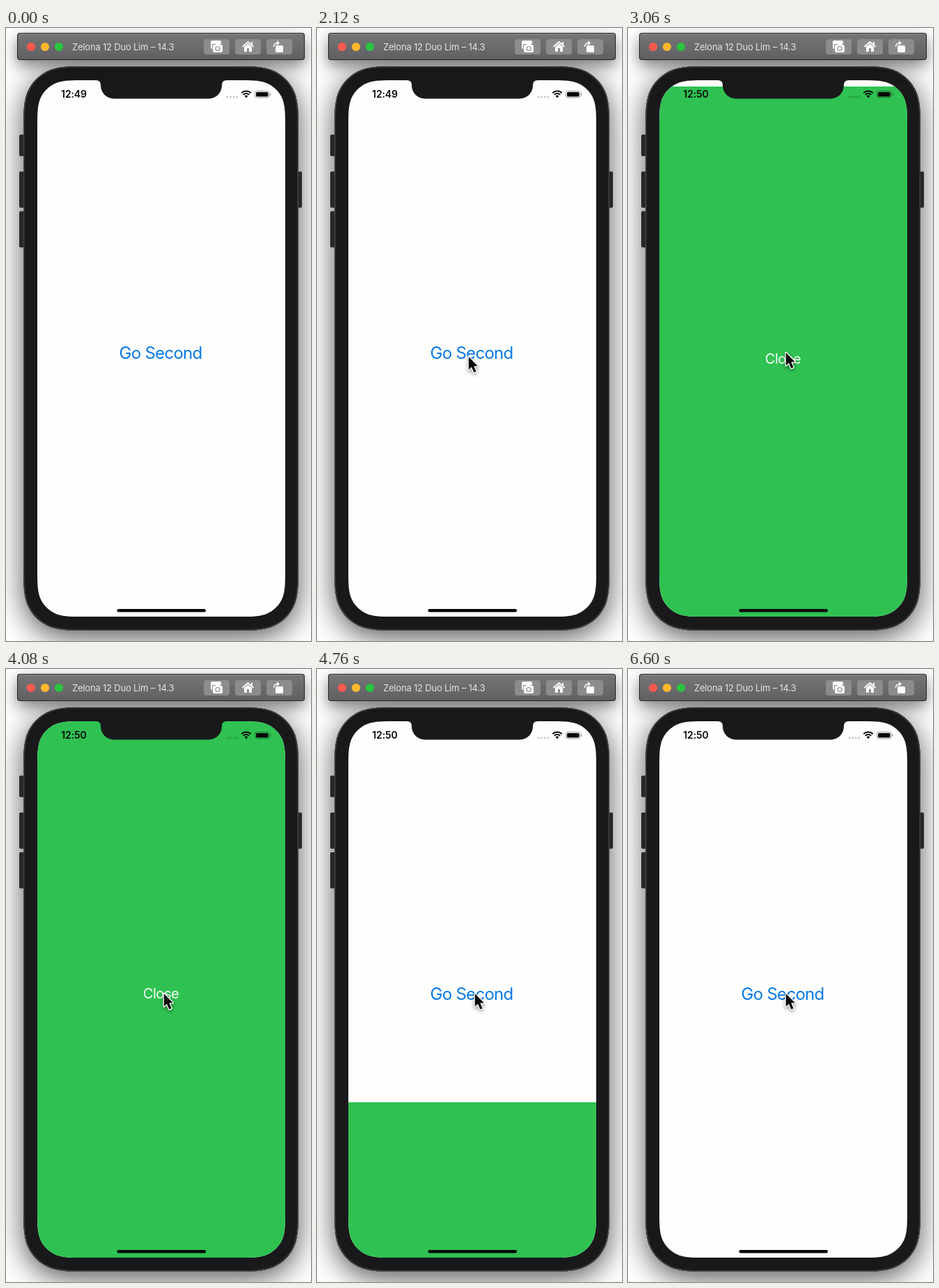
An HTML page with a canvas for the animation above (6620 ms loop, 438 by 880 pixels).

```html
<!DOCTYPE html>
<html lang="en">
<head>
<meta charset="utf-8">
<title>Modal demo</title>
<style>
html, body { margin: 0; width: 100%; height: 100%; overflow: hidden; background: #fff; }
canvas { display: block; width: 438px; height: 880px; }
</style>
</head>
<body>
<canvas id="stage" width="438" height="880"></canvas>
<script>
const W = 438, H = 880, LOOP = 6620;
const SCREEN = { x: 45, y: 75, w: 356, h: 770, r: 45 };
const FONT = 'Inter, Roboto, sans-serif';
const WHITE = '#fdfdfd', BODY = '#19191b', INK = '#080808', BUTTON = '#8c8c8e';
const ctx = document.getElementById('stage').getContext('2d');

function box(c, x, y, w, h, r, fill) {
  c.beginPath();
  c.roundRect(x, y, w, h, r);
  if (fill) { c.fillStyle = fill; c.fill(); }
}

// Rounded rectangle with continuous-curvature corners.
function smoothBox(c, x, y, w, h, r, fill) {
  const corners = [[x, y, 1, 0], [x + w, y, 0, 1], [x + w, y + h, -1, 0], [x, y + h, 0, -1]];
  c.beginPath();
  for (const [cx, cy, ux, uy] of corners) {
    // a runs along the outgoing edge, b along the incoming one
    const at = (a, b) => [cx + (a * ux - b * uy) * r, cy + (a * uy + b * ux) * r];
    c.lineTo(...at(0, 1.528));
    c.bezierCurveTo(...at(0, 1.088), ...at(0, 0.868), ...at(0.075, 0.631));
    c.bezierCurveTo(...at(0.169, 0.373), ...at(0.373, 0.169), ...at(0.631, 0.075));
    c.bezierCurveTo(...at(0.868, 0), ...at(1.088, 0), ...at(1.528, 0));
  }
  c.closePath();
  if (fill) { c.fillStyle = fill; c.fill(); }
}

function disc(c, x, y, r, fill) {
  c.beginPath();
  c.arc(x, y, r, 0, Math.PI * 2);
  c.fillStyle = fill;
  c.fill();
}

function poly(c, points) {
  c.beginPath();
  points.forEach(([x, y], i) => i ? c.lineTo(x, y) : c.moveTo(x, y));
  c.closePath();
}

function label(c, text, x, y, size, color, { weight = 400, spacing = 0, align = 'center' } = {}) {
  c.font = `${weight} ${size}px ${FONT}`;
  c.letterSpacing = spacing + 'px';
  c.textAlign = align;
  c.textBaseline = 'alphabetic';
  c.fillStyle = color;
  c.fillText(text, x, y);
}

function shadow(c, color, blur, dy, draw) {
  c.save();
  c.shadowColor = color;
  c.shadowBlur = blur;
  c.shadowOffsetY = dy;
  draw();
  c.restore();
}

function vertical(c, y0, y1, from, to) {
  const g = c.createLinearGradient(0, y0, 0, y1);
  g.addColorStop(0, from);
  g.addColorStop(1, to);
  return g;
}

function drawBody(c) {
  shadow(c, 'rgba(20,20,24,0.72)', 42, 10, () => smoothBox(c, 25, 55, 395, 810, 63, BODY));
  for (const [x, y, w, h] of [[19, 153, 7, 31], [19, 206, 7, 52], [19, 263, 7, 52], [419, 206, 6, 52]]) {
    box(c, x, y, w, h, 2, '#28282b');
  }
  smoothBox(c, 25, 55, 395, 810, 63, BODY);
  smoothBox(c, 25.75, 55.75, 393.5, 808.5, 62.5);
  c.strokeStyle = '#434347';
  c.lineWidth = 1.5;
  c.stroke();
}

function drawCameraIcon(c) {
  box(c, 294, 18, 15, 12, 2, WHITE);
  box(c, 296, 23, 16, 12, 2, BUTTON);
  box(c, 297, 24, 14, 11, 2, WHITE);
  box(c, 301, 22.5, 6, 4, 1, WHITE);
  c.beginPath();
  c.arc(304, 29.5, 3, 0, Math.PI * 2);
  c.strokeStyle = BUTTON;
  c.lineWidth = 1.2;
  c.stroke();
}

function drawHomeIcon(c) {
  c.beginPath();
  c.moveTo(339.5, 27);
  c.lineTo(347.5, 20);
  c.lineTo(355.5, 27);
  c.strokeStyle = WHITE;
  c.lineWidth = 1.8;
  c.stroke();
  c.fillStyle = WHITE;
  c.fillRect(352, 20, 2, 4);
  poly(c, [[342, 27], [347.5, 22.5], [353, 27], [353, 34], [342, 34]]);
  c.fill();
  c.fillStyle = BUTTON;
  c.fillRect(346, 29, 3, 5);
}

function drawRotateIcon(c) {
  box(c, 387, 25, 11, 10, 1.5, WHITE);
  c.beginPath();
  c.moveTo(384.5, 27);
  c.quadraticCurveTo(384.5, 21.5, 391, 21.5);
  c.strokeStyle = WHITE;
  c.lineWidth = 1.5;
  c.stroke();
  poly(c, [[389, 18], [393, 21.5], [389, 25]]);
  c.fillStyle = WHITE;
  c.fill();
}

function drawToolbar(c) {
  shadow(c, 'rgba(20,20,24,0.55)', 22, 8, () => box(c, 16, 7, 413, 39, 4, '#222224'));
  box(c, 17, 8, 411, 37, 3, vertical(c, 8, 45, '#767678', '#606062'));
  c.fillStyle = '#929294';
  c.fillRect(19, 8, 407, 1);
  ['#fd5a50', '#fcb82d', '#2ac53f'].forEach((color, i) => disc(c, 36 + i * 20, 27, 6.1, color));
  label(c, 'Zelona 12 Duo Lim – 14.3', 95, 32, 13, '#e4e4e6', { spacing: -0.2, align: 'left' });
  for (const x of [284, 329, 374]) box(c, x, 16, 37, 22, 4, BUTTON);
  drawCameraIcon(c);
  drawHomeIcon(c);
  drawRotateIcon(c);
}

function makeBackdrop() {
  const layer = document.createElement('canvas');
  layer.width = W;
  layer.height = H;
  const c = layer.getContext('2d');
  c.fillStyle = '#fff';
  c.fillRect(0, 0, W, H);
  drawBody(c);
  drawToolbar(c);
  return layer;
}

function drawNotch() {
  ctx.beginPath();
  ctx.moveTo(129, 74);
  ctx.lineTo(129, 75);
  ctx.quadraticCurveTo(136, 75, 136, 82);
  ctx.arcTo(136, 101.5, 156, 101.5, 19);
  ctx.arcTo(310, 101.5, 310, 82, 19);
  ctx.lineTo(310, 82);
  ctx.quadraticCurveTo(310, 75, 317, 75);
  ctx.lineTo(317, 74);
  ctx.closePath();
  ctx.fillStyle = BODY;
  ctx.fill();
}

function drawStatus(time) {
  label(ctx, time, 97.5, 100, 14, INK, { weight: 600, spacing: -0.1 });
  for (let i = 0; i < 4; i++) disc(ctx, 318 + i * 4.6, 99, 1.5, 'rgba(0,0,0,0.22)');

  ctx.strokeStyle = INK;
  ctx.lineWidth = 2;
  for (const r of [9.5, 6]) {
    ctx.beginPath();
    ctx.arc(345, 100, r, -Math.PI * 0.75, -Math.PI * 0.25);
    ctx.stroke();
  }
  ctx.beginPath();
  ctx.moveTo(345, 100.5);
  ctx.arc(345, 100, 3.4, -Math.PI * 0.75, -Math.PI * 0.25);
  ctx.fillStyle = INK;
  ctx.fill();

  box(ctx, 357.5, 90.5, 20.5, 9.5, 2.8);
  ctx.strokeStyle = 'rgba(0,0,0,0.38)';
  ctx.lineWidth = 1;
  ctx.stroke();
  box(ctx, 359, 92, 17.5, 6.5, 1.5, INK);
  box(ctx, 379, 93.5, 1.4, 3.5, 0.7, 'rgba(0,0,0,0.38)');
}

function drawPointer(x, y) {
  ctx.save();
  ctx.translate(x + 0.8, y + 1);
  poly(ctx, [[0, 0], [0, 18.5], [4.2, 14.8], [7.6, 22.6], [10.8, 21.2], [7.5, 13.6], [13, 13.2]]);
  ctx.lineJoin = 'round';
  ctx.strokeStyle = '#fff';
  ctx.lineWidth = 2.6;
  shadow(ctx, 'rgba(0,0,0,0.45)', 5, 2, () => ctx.stroke());
  ctx.fillStyle = INK;
  ctx.fill();
  ctx.restore();
}

// Critically damped spring: share of the way still to go.
function remaining(ms) {
  if (ms <= 0) return 1;
  const x = ms * 0.0131;
  return (1 + x) * Math.exp(-x);
}

function sheetOffset(t) {
  const share = t < 4596.7 ? remaining(t - 2567.9) : 1 - remaining(t - 4596.7);
  return Math.round(share * SCREEN.h);
}

function ease(t, from, to) {
  const p = Math.min(1, Math.max(0, (t - from) / (to - from)));
  return p * p * (3 - 2 * p);
}

function pointerAt(t) {
  if (t < 1500) return null;
  const enter = 1 - ease(t, 1500, 2120), nudge = ease(t, 2200, 2450);
  return [217 - 70 * enter + 9 * nudge, 471 + 420 * enter - 6 * nudge];
}

function sampleTime(t) {
  const block = Math.floor((t + 20) / 140);
  const phase = (t + 20) - block * 140;
  const step = phase < 20 ? 0 : phase < 40 ? 1 : 2;
  return block * 140 - 20 + step * 140 / 3;
}

const backdrop = makeBackdrop();

function render(t) {
  ctx.drawImage(backdrop, 0, 0);

  const { x, y, w, h, r } = SCREEN;
  ctx.save();
  smoothBox(ctx, x, y, w, h, r);
  ctx.clip();
  ctx.fillStyle = '#fefefd';
  ctx.fillRect(x, y, w, h);
  label(ctx, 'Go Second', 222, 474.5, 24, '#0678e6', { spacing: -0.7 });
  const top = y + sheetOffset(t);
  if (top < y + h) {
    ctx.fillStyle = '#2fc252';
    ctx.fillRect(x, top, w, h);
    label(ctx, 'Close', 222.5, top + 398, 20, '#fbfffb', { spacing: -0.45 });
  }
  ctx.restore();

  drawNotch();
  drawStatus(t < 2400 ? '12:49' : '12:50');
  box(ctx, 159.5, 834, 127.5, 4.5, 2.2, INK);
  const pointer = pointerAt(t);
  if (pointer) drawPointer(...pointer);
}

const start = performance.now();
function tick() {
  render(sampleTime((performance.now() - start) % LOOP));
  requestAnimationFrame(tick);
}
tick();
</script>
</body>
</html>
```
